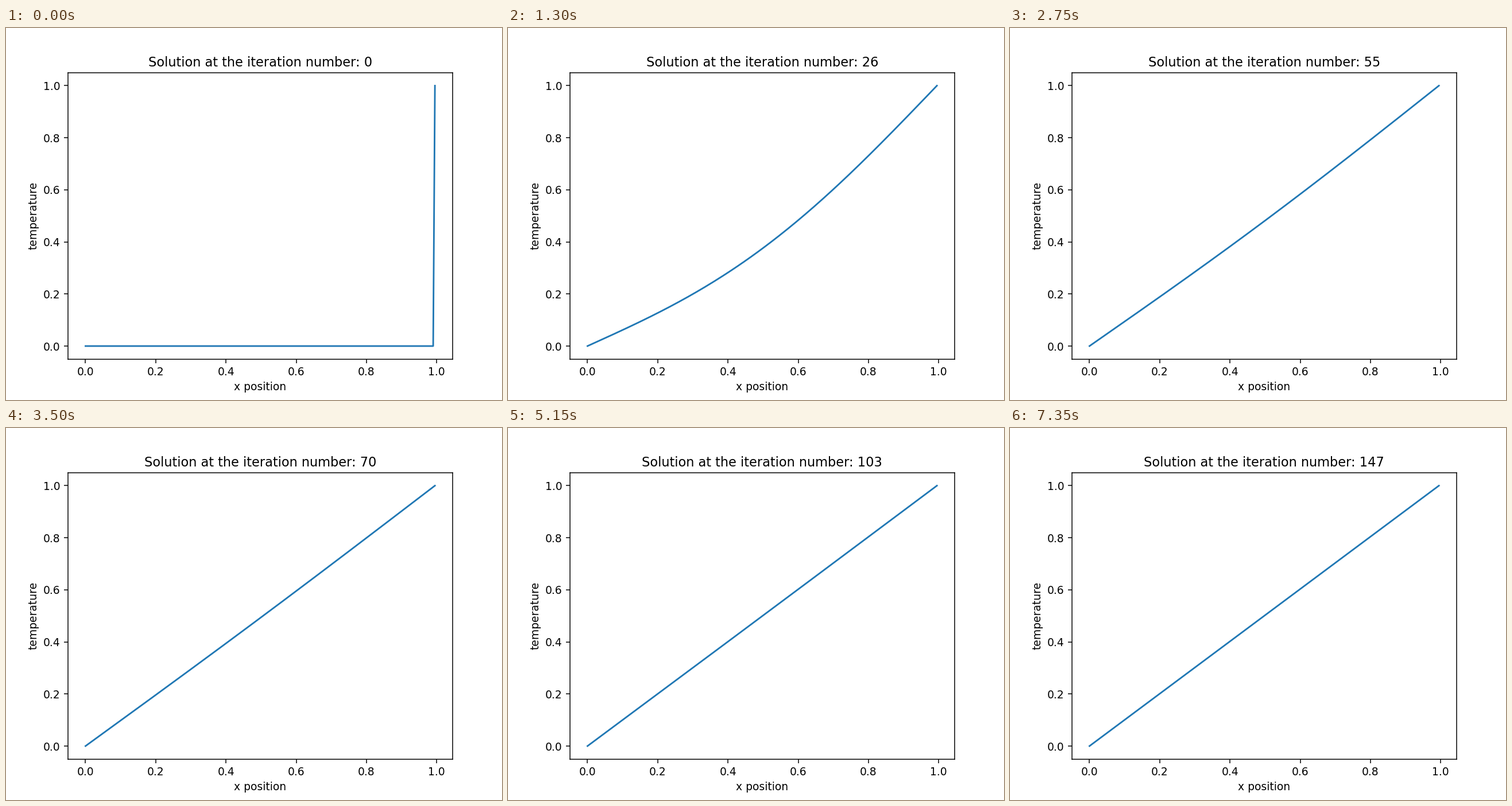
Recreate the animation shown at these times as a matplotlib script. Size 864 by 648 pixels, loop 7400 ms.

```python
import matplotlib.pyplot as plt
import numpy as np
from matplotlib.animation import FuncAnimation

FRAMES, INTERVAL = 148, 50
DX = 0.005
DT = 0.00625  # diffusion time per iteration

x = DX * np.arange(200)
length = x[-1]
k = np.arange(1, 80)
coef = 2 * (-1.0) ** k / (np.pi * k)
modes = np.sin(np.pi * np.outer(x / length, k))
rate = (np.pi * k / length) ** 2


def temperature(n):
    """Heated rod: cold, with the right end held at 1."""
    if n == 0:
        u = np.zeros_like(x)
    else:
        u = x / length + modes @ (coef * np.exp(-rate * DT * n))
    u[0], u[-1] = 0, 1
    return u


fig, ax = plt.subplots(figsize=(6.4, 4.8), dpi=135)
line, = ax.plot(x, temperature(0))
title = ax.set_title("")
ax.set_xlabel("x position")
ax.set_ylabel("temperature")


def update(n):
    line.set_ydata(temperature(n))
    title.set_text(f"Solution at the iteration number: {n}")
    return line, title


anim = FuncAnimation(fig, update, frames=FRAMES, interval=INTERVAL,
                     repeat=True, repeat_delay=0)
plt.show()
```
